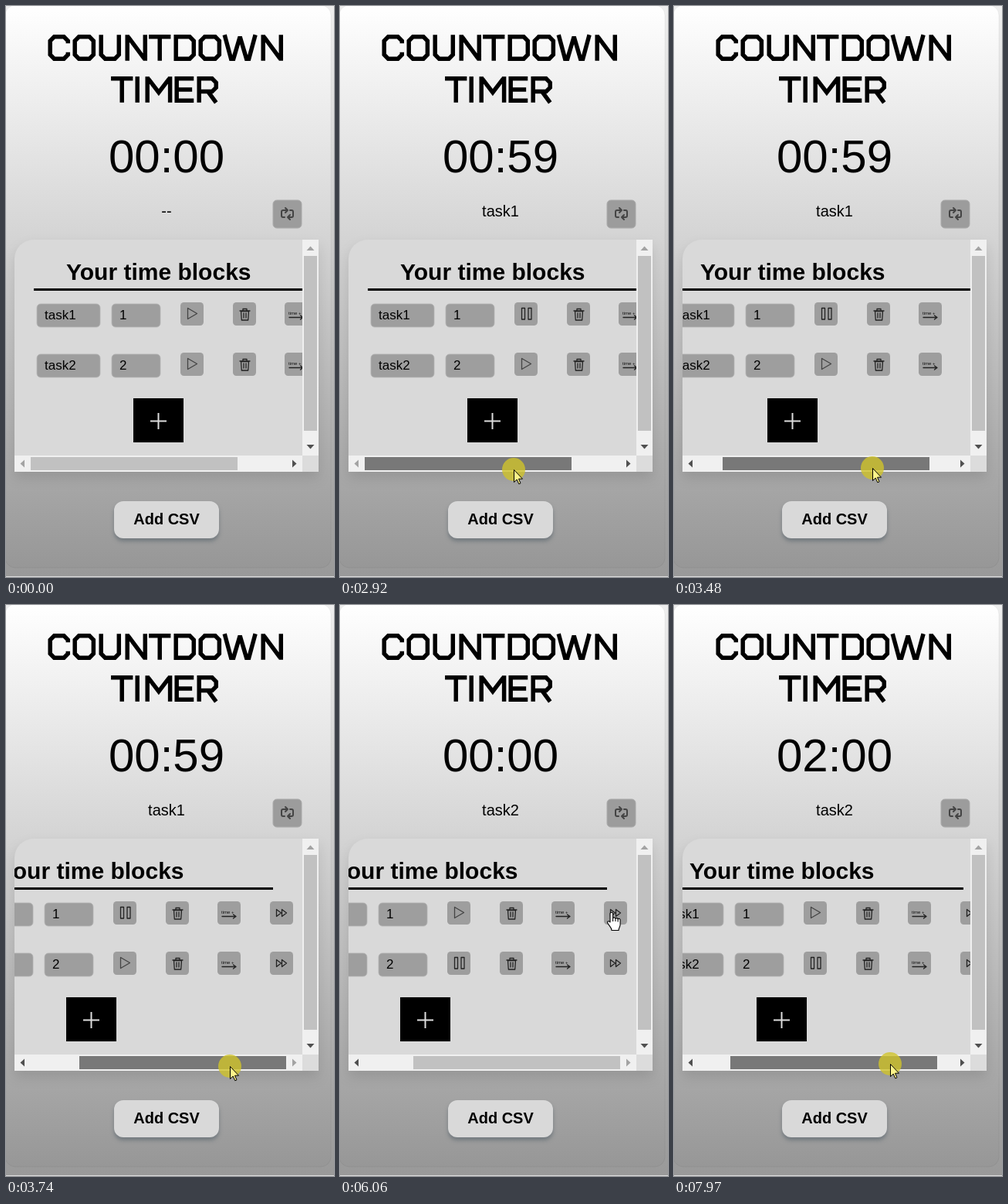
Animation, 425 px wide and 738 px high, one loop 8000 ms. Source, as an HTML page:

```html
<!DOCTYPE html>
<html lang="en">
<head>
<meta charset="utf-8">
<title>Countdown timer</title>
<style>
  html, body { margin: 0; width: 100%; height: 100%; overflow: hidden; background: #999; }
  svg { display: block; }
  text { font-family: "Liberation Sans", Arial, sans-serif; }
  .mid { text-anchor: middle; }
  .bold { font-weight: bold; }
  .icon { fill: none; stroke: #222; stroke-width: 1.3; stroke-linejoin: round; stroke-linecap: round; }
  .panel { filter: drop-shadow(0 8px 8px rgba(0, 0, 0, .11)); }
  .csv { filter: drop-shadow(0 4px 2.5px rgba(75, 90, 100, .5)); }
</style>
</head>
<body>
<svg width="425" height="738" viewBox="0 0 425 738">
  <defs>
    <linearGradient id="page" x2="0" y2="1"><stop stop-color="#eee"/><stop offset="1" stop-color="#999"/></linearGradient>
    <linearGradient id="card" x2="0" y2="1"><stop stop-color="#fff"/><stop offset="1" stop-color="#979797"/></linearGradient>
    <clipPath id="view"><path d="M11 581V327a25 25 0 0 1 25-25H384V581Z"/></clipPath>
    <path id="play" stroke="#444" d="M9.500 7.500V21.500L21.500 14.500Z"/>
    <path id="pause" d="M9.500 7.500h4v14.500h-4zM18 7.500h4v14.500h-4z"/>
    <path id="trash" d="M10.500 11.500h10l-.8 11.500h-8.400zM9 11h13M13 11V8.500h5V11M14 14v6M17 14v6"/>
    <path id="skip" d="M8.500 10.500v9l6-4.500zM15.500 10.500v9l6-4.500z"/>
    <g id="later">
      <text x="5" y="16" font-size="6" fill="#111" stroke="none">time +</text>
      <path d="M6 19.500H24M20.500 17l3.500 2.500-3.500 2.500"/>
    </g>
  </defs>

  <rect width="425" height="738" fill="url(#page)"/>
  <path d="M0 737.500H425" stroke="#ddd"/>
  <rect x="-1" y="-1" width="422" height="727" rx="13" fill="url(#card)" stroke="#000" stroke-opacity=".05"/>

  <g id="title" role="img" aria-label="Countdown timer" fill="none" stroke="#000" stroke-width="5.200" stroke-miterlimit="2"></g>
  <text id="clock" class="mid" x="208" y="215" font-size="60"></text>
  <text id="label" class="mid" x="208" y="272" font-size="20"></text>

  <rect x="346" y="251" width="37" height="36" rx="5" fill="#9c9c9c" stroke="#aaa"/>
  <path class="icon" style="stroke: #444; stroke-width: 2" d="M361 273h-2a2 2 0 0 1-2-2v-5a2 2 0 0 1 2-2h6M362 261l3 3-3 3M368 264h2a2 2 0 0 1 2 2v5a2 2 0 0 1-2 2h-5M368 270l-3 3 3 3"/>

  <path class="panel" fill="#d9d9d9" d="M11 602V327a25 25 0 0 1 25-25H405V602Z"/>
  <g clip-path="url(#view)"><g id="content">
    <text class="bold" x="78" y="354" font-size="30">Your time blocks</text>
    <path d="M36 366.500H433" stroke="#000" stroke-width="3"/>
    <g id="rows"></g>
    <path d="M165 507h65v57h-65z"/>
    <path d="M187 536.500h21M197.500 526v21" stroke="#ddd" stroke-width="2"/>
  </g></g>

  <path fill="#f0f0f0" d="M384 302h21v279h-21zM11 581h373v21H11z"/>
  <path fill="#dcdcdc" d="M384 581h21v21h-21z"/>
  <rect id="vThumb" x="386" y="323" width="17" height="226"/>
  <rect id="hThumb" y="583" width="268" height="17"/>
  <path fill="#a3a3a3" d="M389.500 316h10l-5-5.500z"/>
  <path fill="#505050" d="M389.500 567h10l-5 5.500z"/>
  <path id="toLeft" d="M24 586.500v10l-5.500-5z"/>
  <path id="toRight" d="M371 586.500v10l5.500-5z"/>

  <rect class="csv" x="140" y="640" width="136" height="48" rx="12" fill="#d9d9d9"/>
  <text class="mid bold" x="208" y="670" font-size="20">Add CSV</text>

  <g id="cursor" stroke="#000" stroke-linejoin="round">
    <circle id="glow" r="15" fill="#cfc32a" fill-opacity=".8" stroke="none"/>
    <path id="arrow" d="M.5 .5V16.500L4.200 13 6.800 18.800 9 17.800 6.500 12.200H11.500Z"/>
    <path id="hand" fill="#fff" stroke-width="1.100" d="M-2 13V2a1.800 1.800 0 0 1 3.600 0V8a1.700 1.700 0 0 1 3.300 .5 1.700 1.700 0 0 1 3.200 .8 1.600 1.600 0 0 1 3 1V16c0 3-2 4-2 7.500H0C0 20-3 18-5 14.500c-1.400-2.400 1-3.800 3-1.500zM1.600 8v4M4.900 8.500V12M8.100 9.300V12.500"/>
  </g>
</svg>

<script>
const $ = id => document.getElementById(id);
const set = (id, attrs) => { for (const k in attrs) $(id).setAttribute(k, attrs[k]); };

// Angular display lettering, drawn along the stroke centre line.
const glyphs = {
  C: 'M22 8V5L17 0H5L0 5V22L5 27H17L22 22V19',
  O: 'M5 0H18L23 5V22L18 27H5L0 22V5Z',
  U: 'M0 -2.500V22L5 27H17L22 22V-2.500',
  N: 'M0 29.500V-2.500M22 29.500V-2.500M1 0L21 27',
  T: 'M-3 0H24M10.500 0V29.500',
  D: 'M0 0H17L22 5V22L17 27H0Z',
  W: 'M0 -2.500L8 27H11L19 0L27 27H30L38 -2.500',
  I: 'M0 -2.500V29.500',
  M: 'M0 29.500V-2.500M28 29.500V-2.500M1 0L14 17L27 0',
  E: 'M21 0H0V27H21M0 13.500H19',
  R: 'M0 29.500V0H16L21 5V11L16 16H0M11 16L21 29.500'
};
const letter = (word, y, xs) => [...word].map((c, i) =>
  `<path transform="translate(${xs[i] - .8} ${y}) scale(1.050)" d="${glyphs[c]}"/>`).join('');
$('title').innerHTML =
  letter('COUNTDOWN', 39.8, [58, 90, 124, 158, 189, 221, 253, 284, 334]) +
  letter('TIMER', 93.8, [140, 171, 184, 222, 251]);

const rowTops = [383, 448];
const buttonLefts = [226, 294, 361, 429];
const field = (x, y, w, value) =>
  `<rect x="${x}" y="${y + 2}" width="${w}" height="30" rx="5" fill="#9e9e9e" stroke="#b4b4b4" stroke-width=".8"/>
   <text x="${x + 10}" y="${y + 22}" font-size="17">${value}</text>`;
const button = (x, y, icon, id) =>
  `<rect x="${x}" y="${y}" width="30" height="30" rx="4.500" fill="#9e9e9e"/>
   <use id="${id}" class="icon" href="#${icon}" x="${x}" y="${y}"/>`;
$('rows').innerHTML = rowTops.map((y, i) =>
  field(40, y, 82, 'task' + (i + 1)) + field(137, y, 63, i + 1) +
  ['play', 'trash', 'later', 'skip'].map((icon, j) =>
    button(buttonLefts[j], y, icon, icon + i)).join('')).join('');

const LOOP = 8000, MAX_THUMB = 63, SCROLL_RATIO = 87 / 63;
const path = [ // time, x, y
  [140, 406, 728], [400, 338, 608], [650, 270, 484], [930, 235, 418], [1320, 239, 402],
  [2100, 239, 402], [2350, 233, 495], [2650, 224, 599], [2920, 225, 599], [3130, 228, 599],
  [3480, 257, 597], [3740, 290, 596], [4050, 301, 595], [4470, 394, 535], [4640, 384, 440],
  [4780, 352, 397], [7070, 352, 397], [7400, 336, 490], [7820, 301, 593], [7890, 301, 593],
  [7970, 280, 593], [8000, 276, 593]
];
const presses = [[1830, 1900], [2850, 4050], [5960, 6060], [7890, 8000]];
const clocks = [[0, '00:00'], [2850, '00:59'], [3760, '00:58'], [4770, '00:57'],
  [5760, '00:56'], [6060, '00:00'], [7070, '02:00']];
const labels = [[0, '--'], [1870, 'task1'], [6060, 'task2']];

const at = (steps, t) => steps.filter(s => s[0] <= t).pop()[1];
const inside = (v, start, size) => v >= start && v < start + size;

function cursorAt(t) {
  const i = Math.max(1, path.findIndex(p => p[0] > t));
  const [t0, x0, y0] = path[i - 1], [t1, x1, y1] = path[i];
  const k = Math.max(0, (t - t0) / (t1 - t0));
  return [x0 + (x1 - x0) * k, y0 + (y1 - y0) * k];
}

function thumbOffset(t, x) {
  if (t < 2850) return 0;
  if (t < 4050) return Math.min(MAX_THUMB, Math.max(0, x - 225.4));
  return t < 7890 ? MAX_THUMB : MAX_THUMB + x - 301;
}

function draw(t) {
  const [x, y] = cursorAt(t);
  const pressed = presses.some(([a, b]) => t >= a && t < b);
  const thumb = thumbOffset(t, x), scroll = thumb * SCROLL_RATIO;
  const label = at(labels, t);
  const overButton = rowTops.some(top => inside(y, top, 30)) &&
    buttonLefts.some(left => inside(x + scroll, left, 30));
  const overH = inside(y, 583, 17) && inside(x, 32 + thumb, 268);
  const overV = inside(x, 386, 17) && inside(y, 323, 226);

  $('clock').textContent = at(clocks, t);
  $('label').textContent = label;
  rowTops.forEach((_, i) =>
    set('play' + i, { href: label === 'task' + (i + 1) ? '#pause' : '#play' }));

  set('content', { transform: `translate(${-Math.round(scroll)} 0)` });
  set('hThumb', { x: 32 + Math.floor(thumb), fill: overH ? (pressed ? '#787878' : '#a8a8a8') : '#c1c1c1' });
  set('vThumb', { fill: overV ? '#a8a8a8' : '#c1c1c1' });
  set('toLeft', { fill: thumb > 0 ? '#505050' : '#a3a3a3' });
  set('toRight', { fill: thumb < MAX_THUMB ? '#505050' : '#a3a3a3' });

  set('cursor', { transform: `translate(${Math.round(x)} ${Math.round(y)})`, visibility: t < 140 ? 'hidden' : 'visible' });
  set('glow', { opacity: +pressed });
  set('arrow', { opacity: +!overButton, fill: pressed ? '#fdf48a' : '#fff' });
  set('hand', { opacity: +overButton });
}

const start = performance.now();
function frame() {
  draw((performance.now() - start) % LOOP);
  requestAnimationFrame(frame);
}
frame();
</script>
</body>
</html>
```
